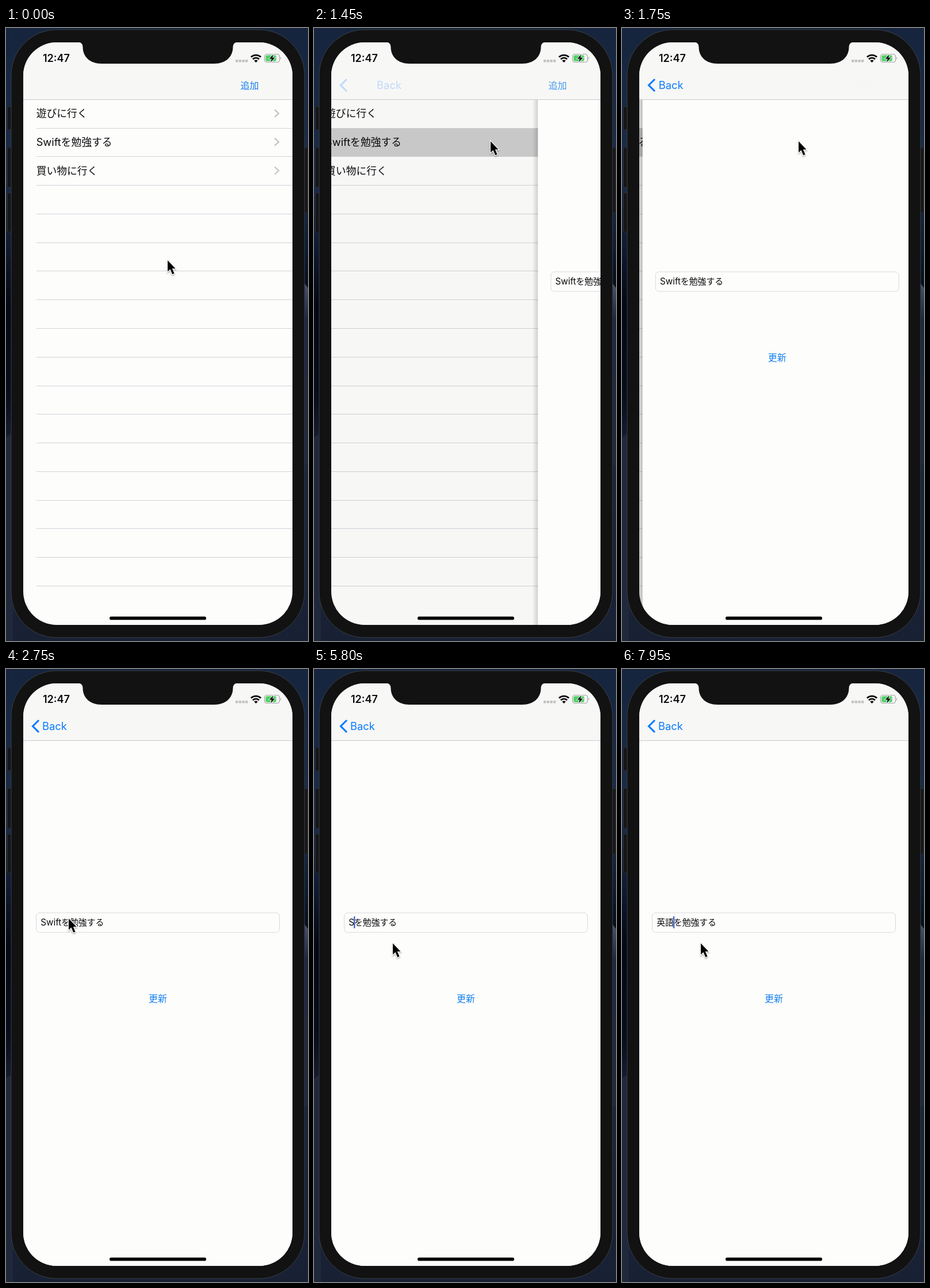
An HTML page for the animation above (8000 ms loop, 525 by 1066 pixels).

```html
<!DOCTYPE html>
<html lang="ja">
<head>
<meta charset="utf-8">
<title>ToDo list</title>
<style>
  html, body { margin: 0; width: 100%; height: 100%; overflow: hidden; background: #131a2a; }
  svg { display: block; width: 525px; height: 1066px; }
  text { font-family: Inter, "Noto Sans CJK JP", "Noto Sans CJK", sans-serif; fill: #0b0b0d; white-space: pre; }
  .jp { font-family: "Noto Sans CJK JP", "Noto Sans CJK", sans-serif; }
  .row { font-size: 18.2px; }
  .row .jp { font-size: 17.8px; }
  .input { font-size: 15.2px; }
  .input .jp { font-size: 14.8px; }
  .link { font-size: 16px; fill: #1480f0; }
</style>
</head>
<body>
<svg viewBox="0 0 525 1066">
  <defs>
    <linearGradient id="wall" x2="0" y2="1">
      <stop offset="0" stop-color="#16253d"/>
      <stop offset=".25" stop-color="#1b2c49"/>
      <stop offset=".36" stop-color="#0e1a30"/>
      <stop offset=".45" stop-color="#030814"/>
      <stop offset=".6" stop-color="#060d1c"/>
      <stop offset=".7" stop-color="#1b2438"/>
      <stop offset="1" stop-color="#182034"/>
    </linearGradient>
    <linearGradient id="ridge" x2="0" y2="1">
      <stop offset="0" stop-color="#4a566c"/>
      <stop offset=".4" stop-color="#1d2740"/>
      <stop offset="1" stop-color="#1d2740"/>
    </linearGradient>
    <linearGradient id="edge">
      <stop offset="0" stop-opacity="0"/>
      <stop offset="1" stop-opacity=".16"/>
    </linearGradient>
    <clipPath id="screen"><rect x="30" y="25" width="468" height="1013" rx="58"/></clipPath>
    <clipPath id="body"><rect x="30" y="124.5" width="468" height="920"/></clipPath>
    <filter id="soft" x="-50%" y="-50%" width="200%" height="200%">
      <feDropShadow dx="0" dy="1.5" stdDeviation="1.3" flood-opacity=".4"/>
    </filter>
  </defs>

  <rect width="525" height="1066" fill="url(#wall)"/>
  <path d="M0 712L12 704V1066H0Z" fill="#20293c"/>
  <path d="M516 440L525 452V604H516Z" fill="url(#ridge)"/>
  <path d="M516 604H525V760H516Z" fill="#20293c"/>
  <g fill="#161617" stroke="#2c2d30">
    <rect x="2.5" y="137" width="10" height="40" rx="2"/>
    <rect x="2.5" y="208" width="10" height="69" rx="2"/>
    <rect x="2.5" y="287" width="10" height="68" rx="2"/>
    <rect x="514" y="208" width="10.5" height="114" rx="2"/>
    <rect x="9" y="3" width="510" height="1057" rx="79" fill="#121212" stroke="#3a3e46"/>
  </g>

  <g clip-path="url(#screen)">
    <rect x="30" y="25" width="468" height="1013" fill="#fdfdfc"/>
    <g clip-path="url(#body)">
      <g id="list">
        <rect id="picked" x="30" y="174" width="468" height="49.6" fill="#cdcdcd"/>
      </g>
      <rect id="dim" x="30" y="124" width="468" height="914"/>
      <g id="page">
        <rect id="shade" x="20" y="124" width="10" height="914" fill="url(#edge)"/>
        <rect x="30" y="124" width="468" height="914" fill="#fdfdfc"/>
        <rect x="52.5" y="424" width="423" height="34" rx="6" fill="none" stroke="#d9d9dc"/>
        <rect id="mark" y="431" height="20" fill="#cfdff5"/>
        <text class="input" x="60.3" y="446" id="field"><tspan id="latin"></tspan><tspan id="kana" class="jp"></tspan></text>
        <rect id="caret" y="430" width="2.4" height="21" rx="1" fill="#4467d2"/>
        <text class="jp link" x="248" y="579">更新</text>
      </g>
    </g>

    <rect x="30" y="25" width="468" height="99" fill="#f7f7f6"/>
    <path d="M30 124.5H498" stroke="#c9c9cd"/>
    <path id="arrow" d="M57 89L46.5 99.5L57 110" fill="none" stroke="#0a7aff" stroke-width="3.1"/>
    <text id="back" x="63" y="106" font-size="18.4" style="fill:#0a7aff">Back</text>
    <text id="add" class="jp link" x="407.5" y="106">追加</text>

    <text x="64" y="59" font-size="18" font-weight="600">12:47</text>
    <g fill="#c2c2c4">
      <rect x="399" y="55" width="4.4" height="4.4" rx="1"/>
      <rect x="404.7" y="55" width="4.4" height="4.4" rx="1"/>
      <rect x="410.4" y="55" width="4.4" height="4.4" rx="1"/>
      <rect x="416" y="55" width="4.4" height="4.4" rx="1"/>
    </g>
    <g fill="none" stroke="#0b0b0d" stroke-width="2.8">
      <path d="M425.9 50.6A12.3 12.3 0 0 1 443.1 50.6"/>
      <path d="M429 54.2A7.7 7.7 0 0 1 440 54.2"/>
      <path d="M431.3 56.8A4.6 4.6 0 0 1 437.7 56.8L434.5 60Z" fill="#0b0b0d" stroke="none"/>
    </g>
    <rect x="449.5" y="45.5" width="26" height="14" rx="4" fill="none" stroke="#a2a2a5" stroke-width="1.2"/>
    <path d="M477.2 50Q479.6 52.5 477.2 55Z" fill="#a2a2a5"/>
    <rect x="451.3" y="47.3" width="18.5" height="10.4" rx="2.3" fill="#4cd364"/>
    <path d="M464.5 46L457.5 53.5H461.7L460.2 59.5L467.5 51.5H463.2Z" fill="#0b0b0d" stroke="#f7f7f7" stroke-width="1.6" paint-order="stroke"/>
    <rect x="180" y="1023.6" width="168" height="5.6" rx="2.8" fill="#050505"/>
    <path d="M124 24Q133.5 25 133.5 33C133.5 50 146 62 166 62H362C382 62 394.500 50 394.500 33Q394.500 25 404 24Z" fill="#121212"/>
  </g>

  <path id="pointer" d="M0 0V19.500L4.500 15.500L8.200 24.300L11.500 22.800L7.800 14.200H13.500Z" stroke="#fff" stroke-width="2.2" paint-order="stroke" filter="url(#soft)"/>
</svg>

<script>
const LOOP = 8000, WIDTH = 468, PITCH = 49.77;
const TAP = 1320, PUSH = 1400;
const $ = id => document.getElementById(id);
const set = (id, attrs) => {
  for (const k in attrs) $(id).setAttribute(k, attrs[k]);
};

// list rows and separators
const rows = [['', '遊びに行く'], ['Swift', 'を勉強する'], ['', '買い物に行く']];
let list = '';
rows.forEach(([latin, kana], i) => {
  const y = 148.4 + PITCH * i;
  list += `<text class="row" x="52.700" y="${y + 6.6}">${latin}<tspan class="jp">${kana}</tspan></text>` +
    `<path d="M467 ${y - 6.5}l7 6.500l-7 6.500" fill="none" stroke="#c3c3c7" stroke-width="2.2"/>`;
});
for (let i = 1; i < 18; i++) {
  const y = Math.floor(124.3 + PITCH * i) + 0.5;
  list += `<path d="M53 ${y}H498" stroke="#d3d3d8"/>`;
}
$('list').insertAdjacentHTML('beforeend', list);

// start, latin part, Japanese part, caret index (-1: no focus), marked characters
const edits = [
  [0, 'Swift', 'を勉強する', -1, 0],
  [2900, 'Swift', 'を勉強する', 8, 0],
  [4300, 'Swift', 'を勉強する', 7, 0],
  [4500, 'Swift', 'を勉強する', 6, 0],
  [4700, 'Swift', 'を勉強する', 5, 0],
  [5050, 'Swif', 'を勉強する', 4, 0],
  [5250, 'Swi', 'を勉強する', 3, 0],
  [5450, 'Sw', 'を勉強する', 2, 0],
  [5650, 'S', 'を勉強する', 1, 0],
  [5850, '', 'を勉強する', 0, 0],
  [6300, '', 'えを勉強する', 1, 1],
  [6500, '', 'えいを勉強する', 2, 2],
  [6700, '', 'えいｇを勉強する', 3, 3],
  [6850, '', 'えいごを勉強する', 3, 3],
  [7150, '', '英語を勉強する', 2, 2],
  [7500, '', '英語を勉強する', 2, 0]
];

// start, end, destination
const moves = [[350, 1150, 307, 197], [1950, 2650, 109, 434], [3250, 3750, 137, 477]];

const smooth = u => {
  u = Math.min(1, Math.max(0, u));
  return u * u * (3 - 2 * u);
};

// critically damped spring: mass 3, stiffness 1000
const spring = ms => {
  const s = Math.max(0, ms) / 1000 * Math.sqrt(1000 / 3);
  return 1 - (1 + s) * Math.exp(-s);
};

function drawPush(t) {
  const p = spring(t - PUSH), rest = 1 - p;
  set('list', { transform: `translate(${-0.3 * WIDTH * p})` });
  set('page', { transform: `translate(${WIDTH * rest})` });
  set('dim', { opacity: 0.1 * p });
  set('shade', { opacity: t < PUSH || rest < 0.001 ? 0 : 1 });
  set('picked', { opacity: t < TAP ? 0 : 1 });
  set('arrow', { opacity: p });
  set('back', { opacity: p, x: 63 + 60 * rest });
  set('add', { opacity: rest });
}

function drawField(t) {
  const [since, latin, kana, at, marked] = edits.filter(e => e[0] <= t).pop();
  $('latin').textContent = latin;
  $('kana').textContent = kana;
  const width = at > 0 ? $('field').getSubStringLength(0, at) : 0;
  const shown = at >= 0 && (t - since) % 1000 < 600;
  set('caret', { x: 59.3 + width, opacity: shown ? 1 : 0 });
  set('mark', { x: 60.3, width: marked ? width : 0 });
}

function drawPointer(t) {
  let x = 281, y = 404;
  for (const [from, to, tx, ty] of moves) {
    const u = smooth((t - from) / (to - from));
    x += (tx - x) * u;
    y += (ty - y) * u;
  }
  set('pointer', { transform: `translate(${x} ${y})` });
}

let start;
function frame(now) {
  start ??= now;
  const t = (now - start) % LOOP;
  drawPush(t);
  drawField(t);
  drawPointer(t);
  requestAnimationFrame(frame);
}
requestAnimationFrame(frame);
</script>
</body>
</html>
```
